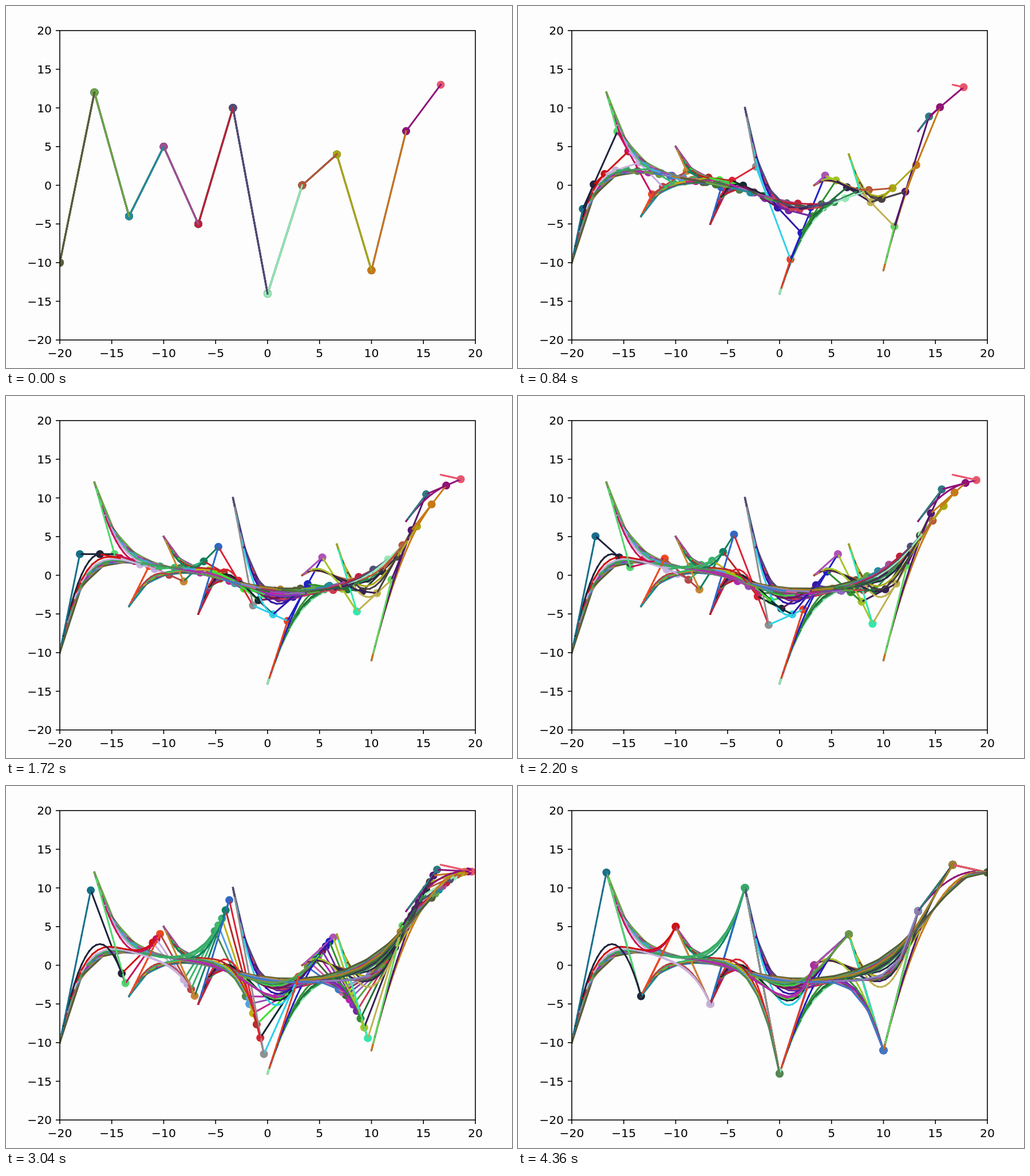
Recreate the animation shown at these times as an HTML page. Size 884 by 633 pixels, loop 4400 ms.

```html
<!DOCTYPE html>
<html lang="en">
<head>
<meta charset="utf-8">
<title>De Casteljau construction</title>
<style>
  html, body { margin: 0; width: 100%; height: 100%; overflow: hidden; background: #fdfdfd; }
  svg { display: block; width: 884px; height: 633px; }
  text { font: 20.3px "DejaVu Sans", sans-serif; fill: #000; }
</style>
</head>
<body>
<svg id="stage" viewBox="0 0 884 633">
  <clipPath id="plotArea"><rect x="94" y="43" width="726" height="541"/></clipPath>
  <g clip-path="url(#plotArea)">
    <g id="dots"></g>
    <g id="links" stroke-width="3" stroke-linecap="square"></g>
    <g id="trails" stroke-width="3" stroke-linecap="square"></g>
  </g>
  <g id="axes" stroke-width="1.6"></g>
</svg>
<script>
const LOOP = 4400;
const LAST = 19;
// Moment at which each construction step appears; steps slow down as trails pile up.
const STARTS = [0, 40, 200, 360, 520, 680, 840, 1020, 1200, 1360,
  1520, 1700, 1880, 2100, 2320, 2540, 2760, 2980, 3240, 3480];
const HEIGHTS = [-10, 12, -4, 5, -5, 10, -14, 0, 4, -11, 7, 13, 12];

// One row of colours per interpolation level.
const COLORS = [
  "17708a 50d870 ec4a20 c88834 2f68c8 909090 e84020 b050b8 30e8b0 60d860 2f7a80 e8586e",
  "20243c c8105c b84444 108060 dc2434 30d0e8 2020c8 a4c428 c0b050 501870 901078",
  "d01010 c4a8e0 38b070 b82828 102830 3018a8 309030 382050 484040 c87818",
  "c8b4dc 40b868 c0b010 40e030 701850 7028a0 207038 282840 a8a810",
  "38a868 50a0e8 c02888 40d048 8830c0 d03850 2c8c48 b85838",
  "508850 9050b0 308838 c020b0 58a040 482060 98e8b8",
  "b028a8 4898a8 386838 9068c0 2c6048 4c5074",
  "6c9840 d060a0 7848a0 386038 c02038",
  "3c78c8 a03060 508048 a44c98",
  "8488c0 487030 1f8ca0",
  "a88028 68a844",
  "545c38"
].map(row => row.split(" ").map(hex => "#" + hex));

const toX = x => 94 + (x + 20) * 18.15;
const toY = y => 313.5 - y * 13.525;
const byId = id => document.getElementById(id);

function setAttrs(node, attrs) {
  for (const key in attrs) node.setAttribute(key, attrs[key]);
}

function add(parent, tag, attrs = {}) {
  const node = document.createElementNS("http://www.w3.org/2000/svg", tag);
  setAttrs(node, attrs);
  parent.appendChild(node);
  return node;
}

const ends = (a, b) => ({ x1: a[0], y1: a[1], x2: b[0], y2: b[1] });

// All levels of the construction at parameter t, control points first.
function construct(t) {
  const levels = [HEIGHTS.map((y, i) => [toX(-20 + i * 40 / 12), toY(y)])];
  while (levels[levels.length - 1].length > 1) {
    const prev = levels[levels.length - 1];
    levels.push(prev.slice(1).map((q, i) =>
      prev[i].map((v, axis) => v + (q[axis] - v) * t)));
  }
  return levels;
}

const steps = Array.from({ length: LAST + 1 }, (_, k) => construct(k / LAST));

function eachPoint(visit) {
  COLORS.forEach((row, r) => row.forEach((color, i) => visit(r + 1, i, color)));
}

function drawAxes() {
  const axes = byId("axes");
  add(axes, "rect", { x: 94, y: 43, width: 726, height: 541, fill: "none", stroke: "#000" });
  for (let v = -20; v <= 20; v += 5) {
    const x = toX(v), y = toY(v);
    const label = String(v).replace("-", "\u2212");
    add(axes, "line", { ...ends([x, 584], [x, 591]), stroke: "#000" });
    add(axes, "line", { ...ends([87, y], [94, y]), stroke: "#000" });
    add(axes, "text", { x, y: 614, "text-anchor": "middle" }).textContent = label;
    add(axes, "text", { x: 80, y: y + 7.3, "text-anchor": "end" }).textContent = label;
  }
}

const movers = [];
eachPoint((r, i, color) => {
  movers.push({
    r, i,
    dot: add(byId("dots"), "circle", { r: 7, fill: color }),
    link: r > 1 ? add(byId("links"), "line", { stroke: color }) : null
  });
});

// Trail pieces are stacked by step, then by level.
const trails = steps.slice(1).map((levels, k) => {
  const group = add(byId("trails"), "g");
  eachPoint((r, i, color) =>
    add(group, "line", { ...ends(steps[k][r][i], levels[r][i]), stroke: color }));
  return group;
});

function show(k) {
  const levels = steps[k];
  for (const { r, i, dot, link } of movers) {
    const [cx, cy] = levels[r][i];
    setAttrs(dot, { cx, cy });
    if (link) setAttrs(link, ends(levels[r - 1][i], levels[r - 1][i + 1]));
  }
  trails.forEach((group, n) => group.setAttribute("display", n < k ? "inline" : "none"));
}

let shown = -1;
const origin = performance.now();

function tick(now) {
  const time = Math.max(0, now - origin) % LOOP;
  const k = STARTS.filter(start => start <= time).length - 1;
  if (k !== shown) show(shown = k);
  requestAnimationFrame(tick);
}

drawAxes();
show(0);
requestAnimationFrame(tick);
</script>
</body>
</html>
```
